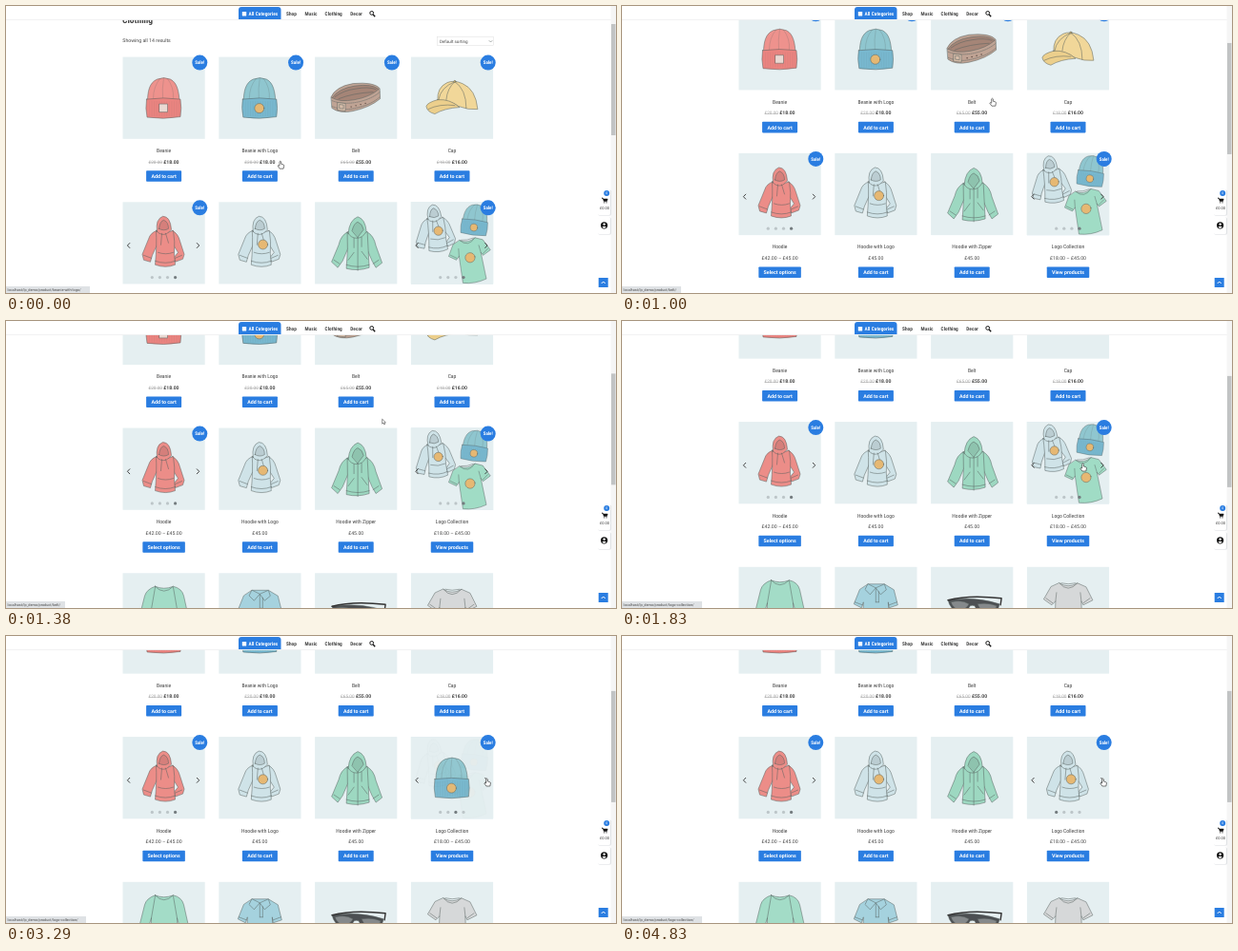
An HTML page that plays this animation: 640x302 px, repeating every 4.87 s.

```html
<!DOCTYPE html>
<html lang="en">
<head>
<meta charset="utf-8">
<title>Shop</title>
<style>
html, body { margin: 0; width: 100%; height: 100%; overflow: hidden; background: #fff; }
svg { display: block; width: 640px; height: 302px; }
text { font: 5.2px Roboto, sans-serif; fill: #444; text-rendering: geometricPrecision; }
.narrow { font-family: "Roboto Condensed", "Open Sans Condensed", "Open Sans", sans-serif; font-stretch: 75%; }
.mid { text-anchor: middle; }
.bold { font-weight: 700; }
.white { fill: #fff; }
.old { fill: #a5a5a5; text-decoration: line-through; }
.ink { stroke: #56605f; stroke-width: .5; stroke-linejoin: round; stroke-linecap: round; }
.line { fill: none; }
</style>
</head>
<body>
<svg id="stage" viewBox="0 0 640 302"></svg>
<script>
const BLUE = '#2a7de1', TILE = '#e5eff1', LOGO = '#e6b873', DOT = '#bcc5c8', DOT_ON = '#737b7e';
const LOOP = 4870, TILE_SIZE = 86.2, COL = 100.8, ROW = 152.7, LEFT = 122.5, TOP = 53.6;
const STATUS = 'localhost/lp_demo/product/';

const group = (x, y, body) => `<g transform="translate(${x} ${y})">${body}</g>`;
const rect = (x, y, w, h, fill, more = '') => `<rect x="${x}" y="${y}" width="${w}" height="${h}" fill="${fill}" ${more}/>`;
const circle = (x, y, r, fill, more = '') => `<circle cx="${x}" cy="${y}" r="${r}" fill="${fill}" ${more}/>`;
const text = (x, y, label, cls = '', size = 5.2, more = '') =>
  `<text x="${x}" y="${y}" class="${cls}" style="font-size:${size}px" ${more}>${label}</text>`;
const shape = (d, fill) => `<path class="ink" d="${d}" fill="${fill}"/>`;
const line = (d, more = '') => `<path class="ink line" d="${d}" ${more}/>`;
const chevron = (x, y, dir) => line(`M${x - dir} ${y - 2.5}l${dir * 2.4} 2.5l${-dir * 2.4} 2.5`, 'style="stroke:#333;stroke-width:.9"');
// Puts a tile drawing with its centre at x, y
const place = (body, x, y, angle, scale) =>
  `<g transform="translate(${x} ${y}) rotate(${angle}) scale(${scale}) translate(-43 -43)">${body}</g>`;

// Clothes, each drawn inside one tile
function beanie(main, cuff, badge) {
  let ribs = '';
  for (let x = 28; x < 60; x += 2.6) ribs += `M${x} 47v15`;
  return shape('M26 47C26 36 28 27 36 23.5Q43 20.5 50 23.5C57 27 59 36 59.5 47z', main) +
    line('M43 22Q41 34 42 44M39 23Q32 31 32 44M47 23Q54 32 53 44', 'opacity=".4"') +
    shape('M25 44.500Q43 42 60.500 44.500Q62 54 60.500 63Q43 66 25.500 63.500Q23.500 54 25 44.500z', cuff) +
    line(ribs, 'opacity=".13"') + badge;
}

function hoodie(color, badge = '') {
  return shape('M36 30Q29 32 27 39L20.500 55L22 61L29 63L31 56L36 45z', color) +
    shape('M52 30Q58 33 60 41L64.500 55L63 60L55 63L54 58L58 53L53 45z', color) +
    shape('M35 30Q44 34 53 30Q55 41 54 54L55 66Q45 70 34 66Q36 44 35 30z', color) +
    shape('M36 31Q34 18 42 15Q50 15 51 29Q46 35 41 34Q37 33 36 31z', color) +
    shape('M38 28Q39 20 43 19Q48 21 48 28Q43 31 38 28z', '#00000018') +
    line('M41 33l-1 12M45 33l3 10M34 62Q45 66 55 62M37 53q8 3 16 0M22 56l8 3M62 56l-7 3') + badge;
}

function zipHoodie(color) {
  return shape('M35 31Q27 35 25 45L17.500 63L24 69L29 62L35 48z', color) +
    shape('M54 31Q62 35 64 46L70.500 64L64 69L60 62L54 48z', color) +
    shape('M34 32Q44 37 55 31L57 69Q45 73 33 70Q35 50 34 32z', color) +
    shape('M35 33Q36 19 45 15.500Q53 18 54 31Q50 38 44 38Q38 38 35 33z', color) +
    shape('M39 30Q41 22 45 21Q50 23 51 29L45 37z', '#00000018') +
    line('M45 37v35M33 66q12 4 24 0M35 61l6-8M55 60l-6-8M41 38v10M49 37v10M20 61l6 4M67 61l-6 4');
}

const tee = (color, badge = '') =>
  shape('M34 17Q43 23 53 17L62 21L69 35L59 40L57 36L58 69Q43 73 29 69L30 36L26 40L17.500 34L25 21z', color) +
  line('M34 17Q43 28 53 17M36 17Q43 19 51 17M30 36l1-9M57 36l-1-9M20 33l7 5M66 33l-7 5') + badge;

const sweater = color =>
  shape('M34 14Q43 18 53 14Q62 16 64 24L72 60L64 63L57 38L58 68Q43 71 29 68L30 38L22 63L14 60L23 24Q25 17 34 14z', color) +
  line('M34 14Q43 24 53 14M34 15L30 38M53 15L57 38M29 64q14 4 29 0');

const polo = color =>
  shape('M35 18L52 18L62 24L66 40L57 43L56 37L58 70Q43 74 29 70L30 37L28 43L20 39L26 24z', color) +
  shape('M35 18L43 22L52 18L54 24L48 29L43 22L37 29L32 24z', color) +
  line('M43 23v14M46 26v11M43 37h3M21 37l8 3M65 37l-8 3');

const belt =
  shape('M17 42Q22 31 40 28Q62 26 68 33L68.500 44Q58 53 40 57Q26 60 18 54z', '#bfa394') +
  shape('M18 43Q25 33 42 30.500Q60 28 67 34Q58 42 42 45Q26 48 18 43z', '#a58577') +
  line('M21 42Q30 35 43 33.500Q56 31 64 34M25 44Q40 38 61 37') +
  line('M18 46Q28 50 42 48Q59 45 68 37M18 52Q30 57 42 54Q60 50 68 42', 'stroke-dasharray="1 1"') +
  shape('M24 48l8 1v8l-8-1zM26 50l4 .5v4l-4-.5z', '#d6bda9') +
  [38, 43, 48, 53].map(x => circle(x, 62 - x * .25, .7, '#57443d')).join('');

const cap =
  shape('M28 46Q27 32 38 27Q45 24 54 28Q68 34 70 55Q60 56 50 52Q40 45 28 46z', '#f1d799') +
  shape('M28 45Q17 48 16 52Q17 58 25 60Q35 54 51 53Q41 44 28 45z', '#eccf8c') +
  line('M46 26Q38 33 37 45M46 26Q58 34 58 54M46 26Q31 32 29 45M18 55Q30 49 46 51') +
  circle(46, 25.8, 1.1, '#d9b76c', 'class="ink"');

const glasses =
  shape('M18 35L26 34Q50 32 72 39Q70 51 58 50Q49 49 46 41Q43 40 41 41Q38 48 29 47Q20 45 18 35z', '#4c4f52') +
  shape('M21 37Q32 34 40 39Q37 45 30 45Q23 44 21 37zM49 39Q60 37 69 41Q67 48 59 48Q52 47 49 39z', '#85898b') +
  line('M18 35Q40 29 74 33L73 40', 'style="stroke:#333;stroke-width:1.4"');

const badge = (x, y, r = 5) => circle(x, y, r, LOGO, 'class="ink"');
const blueBeanie = beanie('#8fc6cf', '#78b8cf', badge(42.5, 54));
const logoHoodie = hoodie('#cfe3e8', badge(46.3, 44.7));
const logoTee = tee('#a0dcc5', badge(43, 40, 6));
const collection = place(logoHoodie, 25.5, 29, -5, .94) + place(blueBeanie, 67.5, 18.5, 8, .76) +
  place(logoTee, 62.5, 61, -10, .86);
const slides = [logoHoodie, logoTee, blueBeanie, collection];

const arrows = chevron(6.3, 45.7, -1) + chevron(78.8, 45.7, 1);
const dots = cls => [0, 1, 2, 3].map(i =>
  circle(30.8 + i * 8.1, 79.3, 1.6, i == 3 ? DOT_ON : DOT, `class="${cls}"`)).join('');
const gallery = slides.map(s => `<g class="slide">${rect(0, 0, TILE_SIZE, TILE_SIZE, TILE)}${s}</g>`).join('');

// name, picture, price, old price, button, on sale
const ADD = 'Add to cart';
const products = [
  ['Beanie', beanie('#ee928d', '#ea8480', rect(38.5, 49.5, 8.5, 8.5, '#ead9d3', 'class="ink"')), '£18.00', '£20.00', ADD, 1],
  ['Beanie with Logo', blueBeanie, '£18.00', '£20.00', ADD, 1],
  ['Belt', belt, '£55.00', '£65.00', ADD, 1],
  ['Cap', cap, '£16.00', '£18.00', ADD, 1],
  ['Hoodie', hoodie('#ec8d88') + arrows + dots('fixed'), '£42.00 – £45.00', '', 'Select options', 1],
  ['Hoodie with Logo', logoHoodie, '£45.00', '', ADD, 0],
  ['Hoodie with Zipper', zipHoodie('#9dd8c1'), '£45.00', '', ADD, 0],
  ['Logo Collection', gallery + arrows + dots('dot'), '£18.00 – £45.00', '', 'View products', 1],
  ['Long Sleeve Tee', sweater('#a3dcc7'), '£25.00', '', ADD, 0],
  ['Polo', polo('#a5d2de'), '£20.00', '', ADD, 0],
  ['Sunglasses', glasses, '£90.00', '', ADD, 0],
  ['T-Shirt', tee('#d6d8d9'), '£18.00', '', ADD, 0]
];

function card([name, picture, price, old, button, sale], i) {
  const mid = TILE_SIZE / 2, w = button == ADD ? 37 : 44.5;
  const prices = old
    ? text(27, 112, old, 'old', 4.7) + text(42.8, 112, price, 'bold', 5.1)
    : text(mid, 112, price, 'mid');
  return group(LEFT + i % 4 * COL, TOP + Math.floor(i / 4) * ROW,
    rect(0, 0, TILE_SIZE, TILE_SIZE, TILE) + picture +
    (sale ? circle(80.8, 6, 8, BLUE) + text(80.8, 7.8, 'Sale!', 'mid white bold narrow', 5) : '') +
    text(mid, 100.5, name, 'mid narrow', 5.6) + prices +
    rect(mid - w / 2, 119.6, w, 11.6, BLUE, 'rx=".8"') + text(mid, 127.3, button, 'mid white bold', 5.3));
}

const heading = text(122, 18.2, 'Clothing', 'narrow bold', 9.5) +
  text(122.3, 38, 'Showing all 14 results') +
  rect(452.5, 32.5, 59, 9, '#fff', 'stroke="#ddd" stroke-width=".5"') +
  text(455, 38.7, 'Default sorting', '', 4.5) + line('M507 36.5l1.5 1.5l1.5-1.5');

const navItem = (x, label, cls = '') => text(x, 10.1, label, 'narrow bold ' + cls, 5.3, 'letter-spacing=".05"');
const header = rect(0, 14, 640, .9, '#eceeef') + rect(0, 0, 640, 14.2, '#fff') +
  `<path d="M244 14V4q0-3 3-3h38.500q3 0 3 3v10z" fill="${BLUE}"/>` +
  rect(247.8, 6, 4.4, 4.6, '#fff', 'rx=".5"') + navItem(254.5, 'All Categories', 'white') +
  navItem(294, 'Shop') + navItem(313.5, 'Music') + navItem(334.6, 'Clothing') + navItem(361.3, 'Decor') +
  '<path d="M385.200 9l2 2.200" stroke="#111" stroke-width="1.300"/>' +
  circle(383.7, 7.4, 1.9, 'none', 'stroke="#111"');

const panel = (y, h) => rect(621.4, y + .6, 13.4, h, '#d9dcdf', 'rx="1.5"') + rect(621, y, 13, h, '#fff', 'rx="1.5"');
const sidebar = panel(193, 27) + panel(222, 18) +
  '<path d="M625 202h1.200l1 3.500h3.300l.7-2.500h-4.700z" fill="#111" stroke="#111" stroke-width=".5"/>' +
  circle(627.7, 206.8, .6, '#111') + circle(630, 206.8, .6, '#111') +
  circle(630.2, 197, 3, BLUE) + text(630.2, 198.3, '0', 'mid white', 3.6) +
  text(628, 214.4, '£0.00', 'mid', 4) +
  circle(627.6, 230.8, 3.6, '#111') + circle(627.6, 229.6, 1.2, '#fff') +
  '<path d="M625.400 233q2.200-2.400 4.400 0q-2.200 1.500-4.400 0z" fill="#fff"/>' +
  rect(621.7, 286, 10, 10, BLUE) + '<path d="M624.700 292l2-2l2 2" fill="none" stroke="#fff"/>';

const hand = '<path d="M-.8 4V.6q.8-1.200 1.600 0V3l2.400.7q.9.3.7 1.300L3.300 8H-.6L-2.700 5q.5-1.200 1.900 0z" fill="#fff" stroke="#222" stroke-width=".6"/>';
const pointer = '<path d="M-1 2v5l1.200-1l.8 1.700l.9-.4l-.8-1.700h1.600z" fill="#fff" stroke="#222" stroke-width=".5"/>';

const $ = id => document.getElementById(id);
$('stage').innerHTML = rect(0, 0, 640, 302, '#fff') +
  `<g id="page">${heading}${products.map(card).join('')}</g>` + header +
  rect(634.5, 0, 5.5, 302, '#f5f5f5') + rect(635, 0, 4.5, 117, '#c1c3c4', 'id="thumb"') + sidebar +
  rect(0, 295, 88, 7, '#dfe2e5', 'id="statusBox"') + text(1.5, 300, '', '', 3.8, 'id="status"') +
  `<g id="cursor"><g id="hand">${hand}</g><g id="pointer">${pointer}</g></g>`;
const slideNodes = [...document.querySelectorAll('.slide')], dotNodes = [...document.querySelectorAll('.dot')];

const progress = (t, from, to) => Math.max(0, Math.min(1, (t - from) / (to - from)));
const smooth = p => p * p * (3 - 2 * p);

// Cursor moves: start, end, x, y
const moves = [[60, 560, 388.5, 97.2], [1300, 1780, 483.5, 150], [1850, 2350, 504.5, 150]];
const clicks = [2850, 3500, 4200];
const links = [[0, 'beanie-with-logo/', 88], [300, 'belt/', 62], [1500, 'logo-collection/', 84]];

function draw(t) {
  const scroll = 100.2 * (1 - (1 - progress(t, 640, 1480)) ** 1.28);
  $('page').setAttribute('transform', `translate(0 ${-scroll})`);
  $('thumb').setAttribute('y', 19 + scroll * .388);

  let x = 287.8, y = 163.2;
  for (const [from, to, toX, toY] of moves) {
    const p = smooth(progress(t, from, to));
    x += (toX - x) * p;
    y += (toY - y) * p;
  }
  $('cursor').setAttribute('transform', `translate(${x} ${y})`);
  const offLink = t > 1100 && t < 1480;
  $('hand').style.display = offLink ? 'none' : '';
  $('pointer').style.display = offLink ? '' : 'none';

  const [, path, width] = links.filter(l => t >= l[0]).pop();
  $('status').textContent = STATUS + path;
  $('statusBox').setAttribute('width', width);

  // Each click fades the top slide away and shows the one below
  const active = 3 - clicks.filter(c => t >= c).length;
  dotNodes.forEach((d, i) => d.setAttribute('fill', i == active ? DOT_ON : DOT));
  slideNodes.slice(1).forEach((s, i) => {
    const click = clicks[2 - i];
    s.style.opacity = 1 - smooth(progress(t, click, click + 500));
  });
}

function tick() {
  draw(performance.now() % LOOP);
  requestAnimationFrame(tick);
}
tick();
</script>
</body>
</html>
```
